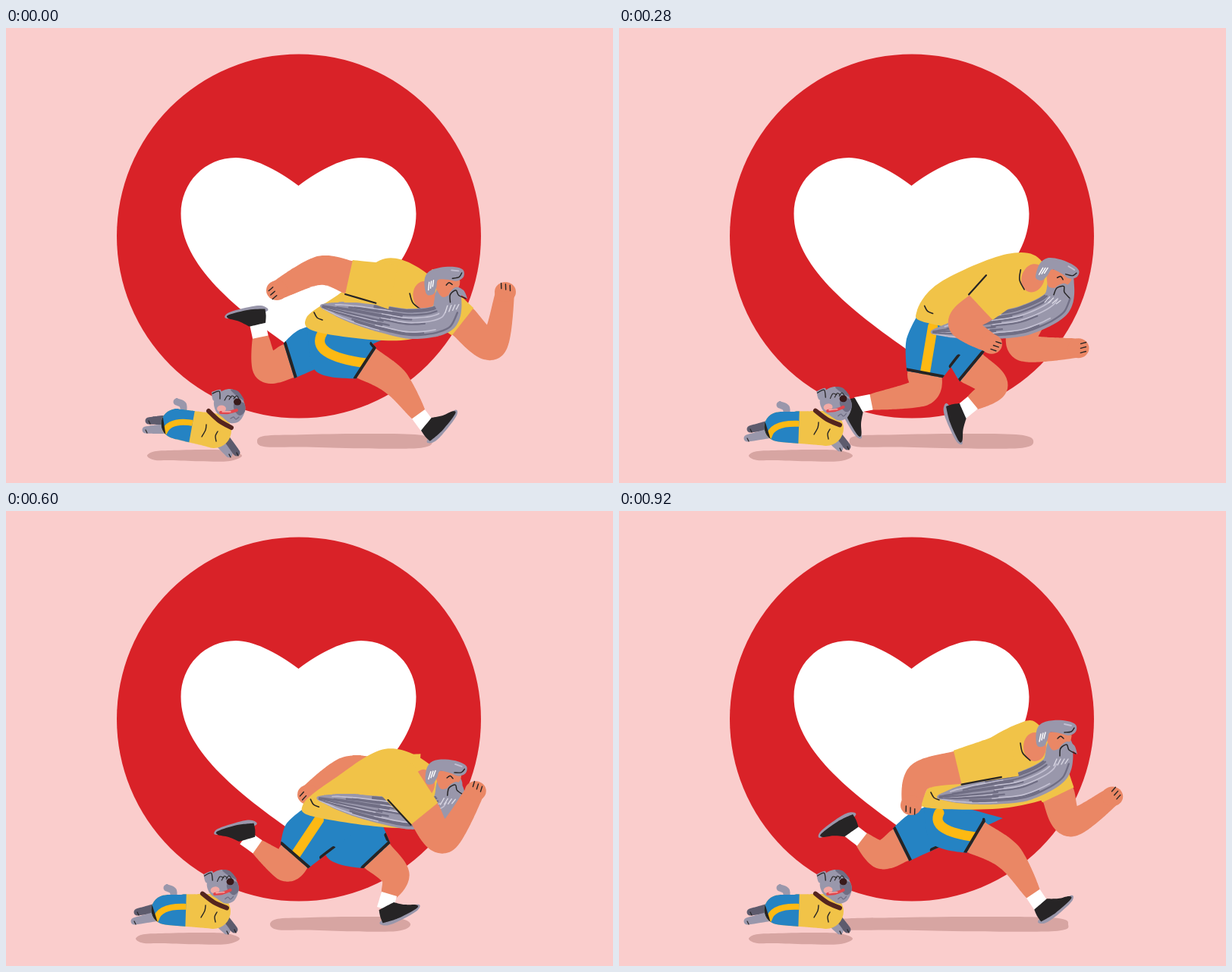
Write an HTML page with a canvas that moves like this. It is 800 px wide and 600 px high and loops after 960 ms.

```html
<!DOCTYPE html>
<html lang="en">
<head>
<meta charset="utf-8">
<title>Running together</title>
<style>
html, body { margin: 0; width: 100%; height: 100%; overflow: hidden; background: #facdcc; }
canvas { display: block; width: 800px; height: 600px; }
</style>
</head>
<body>
<canvas id="stage" width="800" height="600"></canvas>
<script>
const ctx = document.getElementById('stage').getContext('2d');
const C = {
  pink: '#facdcc', red: '#d92228', shade: '#d7a5a2', skin: '#ea8765', shirt: '#f1c348', blue: '#2583c3',
  gold: '#fdb913', ink: '#262425', grey: '#9997ab', dark: '#706e84', light: '#c3c0d2'
};
const LOOP = 960, MAN_STEP = 80, DOG_STEP = 40;
const FAR_LEG = 24, FAR_ARM = 33;   // the far limbs sit this much further right

// Key poses: step in the cycle, then joint positions. Far limbs run half a cycle behind.
const LEG = [   // hem, knee, ankle, foot angle
  [0, 475,442, 512,466, 553,522, -.8],
  [2, 443,463, 451,489, 382,512, .32],
  [4, 365,447, 350,466, 277,472, 1.95],
  [6, 349,439, 320,448, 308,392, 3],
  [8, 418,468, 429,488, 346,488, 2.45],
  [10, 457,426, 498,452, 514,510, 0]
];
const ARM = [   // elbow, hand
  [0, 413,320, 357,346], [2, 421,374, 399,407], [4, 498,402, 583,411], [6, 608,418, 625,348],
  [8, 527,438, 598,402], [10, 470,392, 524,430], [11, 397,350, 385,388]
];
const BODY = [  // rump, back, crest, neck, chest, belly, waist, head angle, shadow ends
  [0, 396,382, 440,350, 500,304, 558,326, 592,375, 530,411, 415,402, -.1, 331,562],
  [2, 389,388, 425,350, 505,315, 560,331, 585,392, 530,417, 408,402, .3, 346,519],
  [4, 398,360, 425,322, 518,279, 555,283, 555,350, 500,388, 410,378, .27, 260,583],
  [5, 401,378, 432,337, 520,283, 556,285, 588,360, 520,390, 412,392, 0, 285,592]
];
const DOG = [   // rump, chest, hind paws, front paws, head, head angle, shadow ends
  [0, 224,522, 274,531, 185,524, 299,561, 293,497, 0, 186,311],
  [1, 226,519, 262,533, 194,541, 270,560, 286,499, .1, 195,294],
  [4, 213,529, 234,535, 222,562, 230,560, 264,508, .45, 196,277],
  [5, 207,530, 243,534, 190,558, 244,555, 268,505, .15, 181,288],
  [7, 211,526, 273,528, 170,535, 296,553, 284,494, -.1, 171,308]
];

const add = (p, x, y) => [p[0] + x, p[1] + y];
const lerp = (a, b, t) => a.map((v, i) => v + (b[i] - v) * t);
const unit = (a, b) => {
  const x = b[0] - a[0], y = b[1] - a[1], d = Math.hypot(x, y) || 1;
  return [x / d, y / d];
};
const point = (p, i) => p.slice(2 * i, 2 * i + 2);
const noise = n => { const v = Math.sin(n * 91.7) * 4375.3; return v - Math.floor(v); };

function hermite(a, b, sa, sb, u) {
  const v = u * u, w = v * u;
  return (2 * w - 3 * v + 1) * a + (w - 2 * v + u) * sa + (3 * v - 2 * w) * b + (w - v) * sb;
}

// Value of a looping keyed track at any time.
function track(keys, period, time) {
  time = (time % period + period) % period;
  const n = keys.length, i = keys.findLastIndex(k => k[0] <= time);
  const row = j => {
    const [t, ...values] = keys[(j + n) % n];
    return [t + period * Math.floor(j / n), ...values];
  };
  const [p, a, b, q] = [i - 1, i, i + 1, i + 2].map(row), span = b[0] - a[0];
  return a.slice(1).map((v, k) => {
    const j = k + 1;
    return hermite(v, b[j], (b[j] - p[j]) / (b[0] - p[0]) * span, (q[j] - v) / (q[0] - a[0]) * span, (time - a[0]) / span);
  });
}

// Point on a smooth line through the given points, s from 0 to 1.
function along(pts, s) {
  const last = pts.length - 1, i = Math.min(last - 1, Math.floor(s * last));
  const at = j => pts[Math.max(0, Math.min(last, j))];
  return [0, 1].map(k => hermite(at(i)[k], at(i + 1)[k],
    (at(i + 1)[k] - at(i - 1)[k]) / 2, (at(i + 2)[k] - at(i)[k]) / 2, s * last - i));
}
function widthAlong(widths, s) {
  const x = s * (widths.length - 1), i = Math.min(widths.length - 2, Math.floor(x));
  return widths[i] + (widths[i + 1] - widths[i]) * (x - i);
}

// A soft limb: round dabs of changing width along a smooth line.
function brush(color, pts, widths) {
  const path = new Path2D(), count = 50 * pts.length;
  for (let i = 0; i <= count; i++) {
    const [x, y] = along(pts, i / count), r = widthAlong(widths, i / count) / 2;
    path.moveTo(x + r, y);
    path.arc(x, y, r, 0, 7);
  }
  ctx.fillStyle = color;
  ctx.fill(path);
  return path;
}

// Smooth outline through flat x, y pairs; listed corners stay sharp.
function curve(p, corners = [], closed = true) {
  const n = p.length / 2, path = new Path2D();
  const at = i => point(p, closed ? (i + n) % n : Math.max(0, Math.min(n - 1, i)));
  const slope = i => corners.includes(i % n) ? [0, 0] : lerp(at(i - 1), at(i + 1), .5).map((v, k) => (v - at(i - 1)[k]) / 3);
  path.moveTo(...at(0));
  for (let i = 0; i < (closed ? n : n - 1); i++) {
    const a = at(i), b = at(i + 1), s = slope(i), e = slope(i + 1);
    path.bezierCurveTo(a[0] + s[0], a[1] + s[1], b[0] - e[0], b[1] - e[1], ...b);
  }
  return path;
}
function fill(color, p, corners) {
  const path = curve(p, corners);
  ctx.fillStyle = color;
  ctx.fill(path);
  return path;
}
function stroke(color, width, path) {
  ctx.strokeStyle = color;
  ctx.lineWidth = width;
  ctx.stroke(path);
}
const line = (color, width, ...p) => stroke(color, width, curve(p, [], false));
function bow(color, width, from, bend, to) {
  const path = new Path2D();
  path.moveTo(...from);
  path.quadraticCurveTo(...bend, ...to);
  stroke(color, width, path);
}
function oval(color, x, y, rx, ry = rx) {
  ctx.fillStyle = color;
  ctx.beginPath();
  ctx.ellipse(x, y, rx, ry, 0, 0, 7);
  ctx.fill();
}
function placed([x, y], turn, draw) {
  ctx.save();
  ctx.translate(x, y);
  ctx.rotate(turn);
  draw();
  ctx.restore();
}
function inside(path, draw) {
  ctx.save();
  ctx.clip(path);
  draw();
  ctx.restore();
}

function backdrop() {
  ctx.fillStyle = C.pink;
  ctx.fillRect(0, 0, 800, 600);
  oval(C.red, 386, 274.5, 240);
  ctx.fillStyle = '#fff';
  ctx.fill(new Path2D('M385.5 208C355 185 325 171 303 171C262 171 230.5 204 230.5 245C230.5 313 303 371 385.5 428' +
    'C468 371 540.5 313 540.5 245C540.5 204 509 171 468 171C446 171 416 185 385.5 208'));
}

function shadow(l, r, top, h) {
  const w = r - l, y = k => top + h * k;
  fill(C.shade, [l, y(.5), l + 10, y(.14), l + w * .25, y(.06), l + w * .6, y(0), r - 18, y(.07),
    r, y(.5), r - 18, y(.95), l + w * .55, y(.96), l + w * .25, y(.88), l + 10, y(.86)]);
}

function shoe() {
  ctx.scale(.95, .95);
  fill(C.grey, [-13, 17, 39, 15, 38, 23, 5, 27, -12, 25]);
  fill(C.ink, [-11, 2, -13, 12, -13, 21, 10, 23, 38, 20, 39, 15, 25, 9, 12, 0], [0, 2, 7]);
}

function leg(step, rump, near) {
  const shift = near ? 0 : FAR_LEG, pose = track(LEG, 12, near ? step : step + 6);
  const [hem, knee, ankle] = [0, 1, 2].map(i => add(point(pose, i), shift, 0));
  const up = unit(ankle, knee), sock = add(ankle, up[0] * 16, up[1] * 16);
  brush(C.skin, [hem, knee, sock], [46, 38, 20]);
  ctx.lineCap = 'butt';
  line('#fff', 21, ...add(ankle, up[0] * -5, up[1] * -5), ...sock);
  ctx.lineCap = 'round';
  placed(ankle, pose[6], shoe);

  const [dx, dy] = unit(hem, knee), front = add(hem, dy * 24, -dx * 24), rear = add(hem, -dy * 24, dx * 24);
  const waist = add(rump, 1 + shift, 5), belt = add(waist, 80, 22), pocket = add(waist, 20, 15);
  const reach = Math.max(0, Math.min(1, (hem[0] - pocket[0] - 25) / 30));
  const seat = add(lerp(waist, rear, .5), -8 - 14 * reach, -3 + 30 * reach);
  const shorts = fill(C.blue, [waist, belt, lerp(belt, front, .5), front, rear, seat].flat(), [0, 1, 3, 4]);
  inside(shorts, () => {
    if (near) bow(C.gold, 13, pocket, add(lerp(pocket, hem, .5), -47 * reach, 10 * reach), hem);
    line(C.ink, 8, ...front, ...rear);
    line(C.ink, 7, ...lerp(belt, front, .55), ...lerp(belt, front, .75));
  });
}

function arm(step, shoulder, near) {
  const shift = near ? 0 : FAR_ARM, pose = track(ARM, 12, near ? step : step + 6);
  const [elbow, hand] = [0, 1].map(i => add(point(pose, i), shift, 0));
  const root = add(shoulder, shift, 0), [dx, dy] = unit(root, elbow), cuff = lerp(root, elbow, .6);
  brush(C.skin, [cuff, elbow, hand], [44, 38, 24]);
  oval(C.skin, ...hand, 14, 13);
  const [fx, fy] = unit(elbow, hand);
  for (const k of [-6, 0, 6]) {
    const knuckle = add(hand, fx * 3 - fy * k, fy * 3 + fx * k);
    line(C.ink, 1.4, ...knuckle, ...add(knuckle, fx * 7 + fy * 2, fy * 7 - fx * 2));
  }
  const side = (p, w) => add(p, -dy * w, dx * w);
  fill(C.shirt, [cuff, cuff, root, root].map((p, i) => side(p, [23, -23, -30, 30][i])).flat(), [0, 1, 2, 3]);
  const s = dx < -.8 ? -1 : 1;
  if (near) line(C.ink, 2.2, ...side(cuff, 23 * s), ...lerp(side(cuff, 23 * s), side(root, 27 * s), .7));
}

function beard(head, tip) {
  const chin = add(head, 22, 14), throat = add(head, 15, 44);
  const hang = s => add(lerp(throat, tip, s), 0, 12 * Math.sin(Math.PI * Math.sqrt(s)));
  const spine = [chin, throat, ...[.25, .5, .7, .85, 1].map(hang)], widths = [34, 40, 40, 36, 29, 20, 4];
  const strand = (from, to, k) => {
    const p = [];
    for (let i = 0; i <= 10; i++) {
      const s = from + (to - from) * i / 10, at = along(spine, s);
      const [dx, dy] = unit(along(spine, Math.max(0, s - .02)), along(spine, Math.min(1, s + .02)));
      const w = widthAlong(widths, s) / 2 * k;
      p.push(...add(at, -dy * w, dx * w));
    }
    return p;
  };
  inside(brush(C.grey, spine, widths), () => {
    for (let i = 0; i < 18; i++) {
      const from = .1 + noise(i + 1) * .45, to = Math.min(.98, from + .2 + noise(i + 40) * .4), k = -.85 + i / 17 * 1.75;
      line(i % 3 ? C.dark : C.light, i % 3 ? 2.4 : 1.7, ...strand(from, to, k));
    }
  });
}

function face() {
  fill(C.skin, [5, -4, 34, -4, 37, 3, 33, 9, 22, 16, 11, 17]);
  line(C.ink, 1.5, 19, 3, 23, 0, 27, 3);
  fill(C.grey, [-8, 12, -9, -6, -2, -17, 14, -21, 32, -20, 43, -15, 43, -6, 34, -1, 22, -4, 9, -5, 6, 4, 1, 13]);
  line(C.ink, 1.4, 28, -5, 37, -6, 41, -11);
  line(C.light, 1.8, 28, -16, 37, -14);
  for (let i = 0; i < 3; i++) line('#fff', 1.4, -5 + 3 * i, 7 - 2 * i, -3 + 3 * i, -3 - i);
  fill(C.grey, [21, 28, 21, 16, 31, 7, 41, 12, 45, 24, 36, 18, 29, 22], [0, 4]);
  line(C.ink, 1.5, 22, 26, 23, 16, 31, 11, 34, 18, 43, 23);
  for (let i = 0; i < 4; i++) line('#dedce8', 1.3, 14 + 5 * i, 39 - i, 18 + 5 * i, 30);
}

function drawMan(step) {
  const body = track(BODY, 6, step);
  const [rump, , crest, neck, , belly] = [0, 1, 2, 3, 4, 5].map(i => point(body, i));
  const [tilt, left, right] = body.slice(14);
  const head = add(neck, 3, 12), shoulder = lerp(crest, belly, .35);
  shadow(left, right, 535, 20);
  arm(step, shoulder, false);
  leg(step, rump, false);
  leg(step, rump, true);
  fill(C.shirt, body.slice(0, 14));
  line(C.ink, 1.6, ...add(rump, 10, -7), ...add(rump, 14, 0), ...add(rump, 21, 3));
  placed(head, tilt, () => {
    oval(C.skin, -11, 14, 15, 19);
    line(C.ink, 1.6, -30, 9, -27, 22, -17, 32);
  });
  beard(head, add(rump, 20, 6 + 22 * Math.cos((step - 3.2) * Math.PI / 3)));
  placed(head, tilt, face);
  arm(step, shoulder, true);
}

function dogHead() {
  line('#54251f', 6, -26, 8, -12, 21, 4, 30);
  fill(C.grey, [-19, -4, -12, -16, 2, -21, 14, -15, 21, -3, 22, 8, 15, 21, 3, 24, -8, 16, -16, 9]);
  fill(C.dark, [3, -20, 13, -18, 21, -6, 12, -11]);
  fill(C.grey, [-20, -6, -22, -17, -10, -20, -12, -7], [1]);
  line(C.ink, 1.3, -21, -15, -12, -18, -11, -8);
  fill(C.dark, [8, -2, 20, -3, 22, 8, 15, 14, 8, 7]);
  for (let i = 0; i < 3; i++) line(C.ink, 1.1, -5 + 6 * i, -6 - i, -1 + 6 * i, -12, 4 + 5 * i, -10 + i);
  oval('#f2aaa5', -9, 5, 6, 4.5);
  line('#e3454b', 4, -10, 10, 0, 10, 11, 7);
  line('#f6b7b3', 1.3, -8, 9, 3, 9);
  oval('#38191a', 12, -4, 5, 4.5);
  line(C.dark, 1.3, 3, 18, 7, 16, 10, 19, 14, 16);
}

function drawDog(step) {
  const pose = track(DOG, 8, step), [rump, chest, hind, fore, head] = [0, 1, 2, 3, 4].map(i => point(pose, i));
  const [tilt, left, right] = pose.slice(10);
  shadow(left, right, 556, 16);
  const limb = (color, from, to, x, y) => {
    brush(color, [add(from, x, y), add(to, x, y)], [15, 9]);
    line(C.ink, 1.2, ...add(to, x, y), ...add(to, x + 2, y + 4));
  };
  limb('#5d5b6d', rump, hind, 3, -6);
  limb('#5d5b6d', chest, fore, 5, -1);
  brush(C.grey, [add(rump, 10, -16), add(rump, 9, -25), add(rump, 1, -29)], [8, 10, 9]);
  limb(C.grey, rump, hind, -1, 6);
  limb(C.grey, chest, fore, -5, 1);
  const body = brush(C.shirt, [rump, chest], [39, 46]);
  const turn = Math.atan2(chest[1] - rump[1], chest[0] - rump[0]), seam = Math.hypot(chest[0] - rump[0], chest[1] - rump[1]) * .42;
  inside(body, () => placed(rump, turn, () => {
    ctx.fillStyle = C.blue;
    ctx.fillRect(-40, -40, 40 + seam, 80);
    ctx.beginPath();
    ctx.rect(-40, -40, 40 + seam, 80);
    ctx.clip();
    bow(C.gold, 8, [-13, 13], [-9, -5], [24, -5]);
    line(C.ink, 4, -20, -4, -13, 16);
  }));
  line(C.ink, 1.4, ...add(chest, -16, 8), ...add(chest, -11, -1), ...add(chest, -10, -8));
  line(C.ink, 1.4, ...add(chest, 3, 14), ...add(chest, 2, 7), ...add(chest, 5, 1));
  placed(head, tilt, dogHead);
}

function draw() {
  const t = performance.now() % LOOP;
  ctx.lineCap = ctx.lineJoin = 'round';
  backdrop();
  drawMan(Math.floor(t / MAN_STEP));
  drawDog(Math.floor(t / DOG_STEP) % 8);
  requestAnimationFrame(draw);
}
draw();
</script>
</body>
</html>
```
